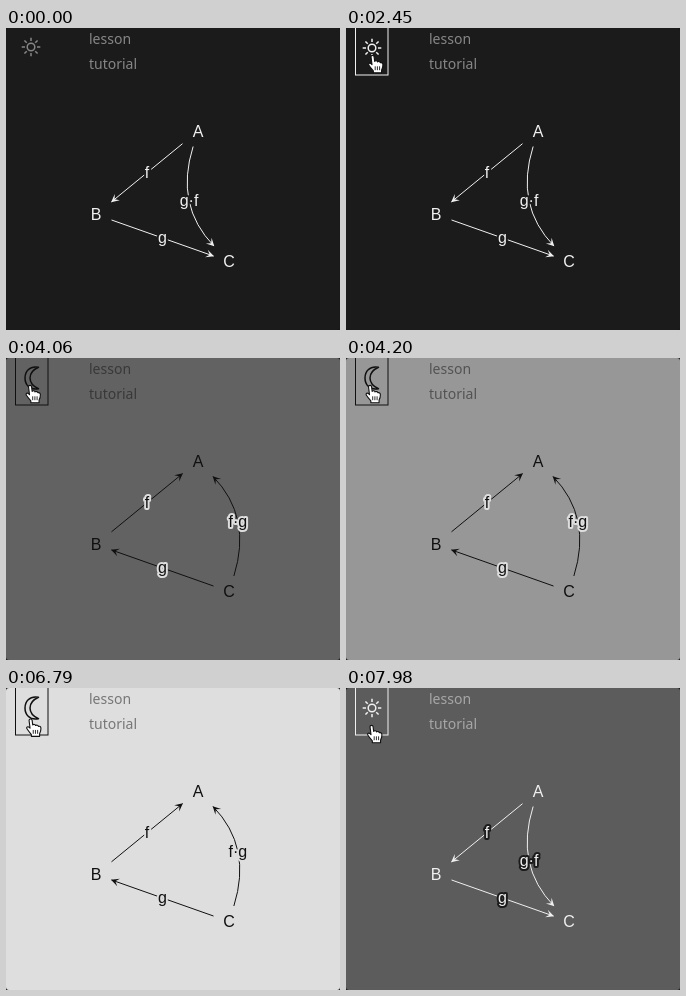
Animation of 334 by 302 pixels, one loop 8000 ms. Source, as an HTML page:

```html
<!DOCTYPE html>
<html lang="en">
<head>
<meta charset="utf-8">
<title>Theme toggle</title>
<style>
  html, body { margin: 0; width: 100%; height: 100%; overflow: hidden; background: #161616; }
  svg { display: block; width: 334px; height: 302px; }
  .nav { font: 14px "Noto Sans", "Open Sans", sans-serif; opacity: .5; }
  .node, .label { font: 16px "Liberation Sans", Arial, sans-serif; text-anchor: middle; }
  .label { paint-order: stroke; stroke: var(--halo); stroke-width: 4px; stroke-linejoin: round; }
  .line { fill: none; stroke: var(--ink); }
  #sun, #moon { stroke-width: 1.5px; stroke-linejoin: round; }
  #scene { fill: var(--ink); }
</style>
</head>
<body>
<svg viewBox="0 0 334 302">
  <rect id="bg" width="334" height="302" rx="3"/>
  <g id="scene">
    <g class="nav"><text x="83" y="16">lesson</text><text x="83" y="41">tutorial</text></g>
    <rect id="box" class="line" x="9.5" y="-2" width="32.5" height="49"/>
    <g id="sun" class="line"></g>
    <path id="moon" class="line"
      d="M32.5 9.3C23 7.5 19 14 19 20S23 32.5 32.5 30.7C26.5 28 24 24.5 24 20S26.5 12 32.5 9.3Z"/>
    <g id="graph"></g>
    <g id="nodes" class="node"></g>
  </g>
  <circle id="ring" r="22" fill="none" stroke="#888" stroke-opacity=".4"/>
  <path id="arrow" fill="#111" stroke="#fff" stroke-linejoin="round"
    d="M0 0V14L3.2 11L5.4 16L7.8 15L5.6 10.2H10Z"/>
  <g id="hand" fill="#fff" stroke="#111" stroke-linejoin="round" stroke-linecap="round">
    <path d="M-1.8 1.2C-1.8 -.5 .9 -.5 1 1.2L1.5 5.3C2.2 4.5 4 4.7 4.1 5.8C5 5.2 6.5 5.5 6.7 6.6C7.9 6.2 9 6.9 9 8.3C9 11 8.4 12 7.8 13.2V15.7H.3V14C-1.2 12.2 -2.4 10.8 -3.7 8.8C-4.7 7.2 -2.8 6.3 -1.7 7.5L-.9 8.3Z"/>
    <path fill="none" stroke-width=".8" d="M2 10.2V13M4 10.2V13M6 10.2V13"/>
  </g>
</svg>
<script>
const $ = id => document.getElementById(id);
const LOOP = 8000, STEP = 70, FADE = 1000;
const ENTER = 490, HOVER = 2450, TO_LIGHT = 3830, TO_DARK = 7560;
const DARK = 0x1b, LIGHT = 0xde;
const NODES = { A: { x: 192, y: 103 }, B: { x: 90, y: 186.5 }, C: { x: 223, y: 233.5 } };
const GAP = 15.5, BEND = 40;

// Cursor moves, each from where the last one ended
const MOVES = [
  { at: ENTER, ms: 770, x: 24, y: 34 },
  { at: 1330, ms: 1120, x: 27, y: 27.5 },
  { at: 2660, ms: 490, x: 24.5, y: 27.5 },
  { at: 6720, ms: 350, x: 26, y: 37.5 }
];
const CLICKS = [{ at: 1960, ms: 140 }, { at: 3640, ms: 190 }, { at: 7490, ms: 70 }];

const clamp = k => Math.min(1, Math.max(0, k));

// Leave the square around a node, heading for p
function leave(node, p) {
  const dx = p.x - node.x, dy = p.y - node.y;
  const k = GAP / Math.max(Math.abs(dx), Math.abs(dy));
  return { x: node.x + dx * k, y: node.y + dy * k };
}

function edge(from, to, name, bend = 0) {
  const dx = to.x - from.x, dy = to.y - from.y, len = Math.hypot(dx, dy);
  const c = {
    x: (from.x + to.x) / 2 - dy / len * bend,
    y: (from.y + to.y) / 2 + dx / len * bend
  };
  const a = leave(from, c), b = leave(to, c);
  const turn = Math.atan2(b.y - c.y, b.x - c.x) * 180 / Math.PI;
  const mid = axis => (a[axis] + 2 * c[axis] + b[axis]) / 4;
  return `<path class="line" d="M${a.x} ${a.y}Q${c.x} ${c.y} ${b.x} ${b.y}"/>` +
    `<path d="M.5 0L-7.5 -4L-4 0L-7.5 4Z" transform="translate(${b.x} ${b.y}) rotate(${turn})"/>` +
    `<text class="label" x="${mid("x")}" y="${mid("y") + 5.3}">${name}</text>`;
}

function graph(light) {
  const { A, B, C } = NODES;
  const link = (p, q, ...rest) => light ? edge(q, p, ...rest) : edge(p, q, ...rest);
  return link(A, B, "f") + link(B, C, "g") + link(A, C, light ? "f·g" : "g·f", BEND);
}

function build() {
  let sun = '<circle r="3.8"/>';
  for (let turn = 0; turn < 360; turn += 45) {
    sun += `<path d="M6 0H9.3" transform="rotate(${turn})"/>`;
  }
  $("sun").innerHTML = sun;
  $("nodes").innerHTML = Object.entries(NODES)
    .map(([name, p]) => `<text x="${p.x}" y="${p.y + 5.5}">${name}</text>`).join("");
}

// The CSS "ease" curve, solved by bisection
function ease(x) {
  if (x <= 0 || x >= 1) return clamp(x);
  let lo = 0, hi = 1;
  for (let i = 0; i < 20; i++) {
    const s = (lo + hi) / 2;
    if (.75 * s * (1 - s) + s ** 3 < x) lo = s; else hi = s;
  }
  return .3 * lo * (1 - lo) ** 2 + 3 * lo * lo * (1 - lo) + lo ** 3;
}

const brightness = t => ease((t - TO_LIGHT) / FADE) - ease((t - TO_DARK - 30) / FADE);

function cursorAt(t) {
  let x = 261, y = 289;
  for (const m of MOVES) {
    const k = 1 - (1 - clamp((t - m.at) / m.ms)) ** 2;
    x += (m.x - x) * k;
    y += (m.y - y) * k;
  }
  return `translate(${x} ${y})`;
}

const show = (id, on) => $(id).setAttribute("display", on ? "inline" : "none");
const place = (id, transform) => $(id).setAttribute("transform", transform);
const grey = v => `rgb(${v},${v},${v})`;
let wasLight;

function setTheme(light) {
  if (light === wasLight) return;
  wasLight = light;
  $("scene").style.setProperty("--ink", light ? "#101010" : "#f0f0f0");
  $("scene").style.setProperty("--halo", grey(light ? LIGHT : DARK));
  $("graph").innerHTML = graph(light);
  show("sun", !light);
  show("moon", light);
}

function draw(time) {
  const t = Math.floor(time % LOOP / STEP) * STEP;
  const hover = t >= HOVER;
  setTheme(t >= TO_LIGHT && t < TO_DARK);
  $("bg").setAttribute("fill", grey(Math.round(DARK + (LIGHT - DARK) * brightness(t))));

  show("box", hover);
  $("sun").setAttribute("opacity", hover ? 1 : .5);
  place("sun", hover ? "translate(26 20)" : "translate(25 19)");

  const cursor = cursorAt(t);
  show("arrow", t >= ENTER && !hover);
  show("hand", hover);
  show("ring", CLICKS.some(c => t >= c.at && t < c.at + c.ms));
  place("arrow", cursor);
  place("hand", cursor + " scale(1.1)");
  place("ring", cursor);
}

build();
const begin = performance.now();
(function tick() {
  draw(performance.now() - begin);
  requestAnimationFrame(tick);
})();
</script>
</body>
</html>
```
